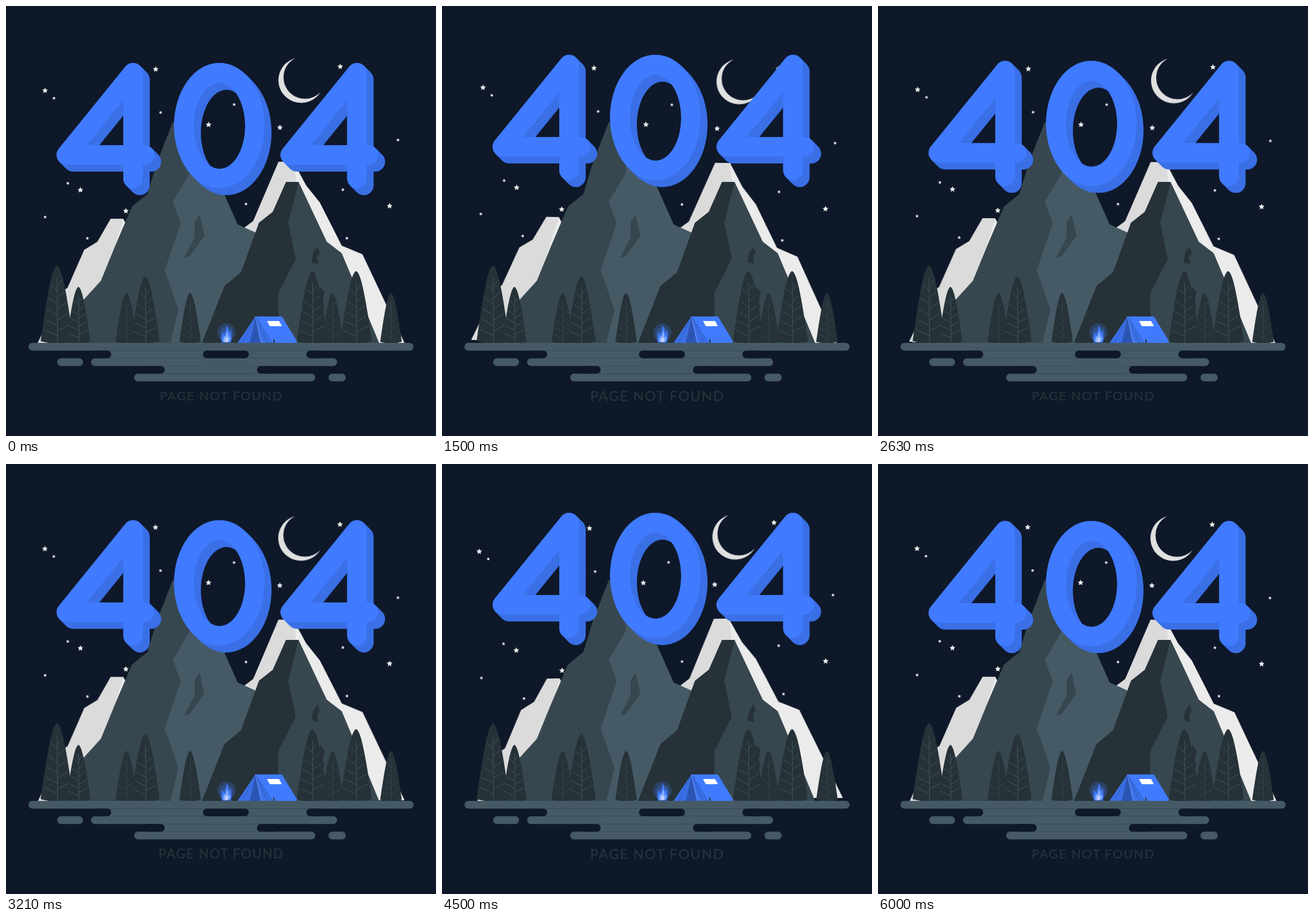
Animation, 748 px wide and 748 px high, one loop 6040 ms. Source, as an HTML page:

```html
<!DOCTYPE html>
<html lang="en">
<head>
<meta charset="utf-8">
<title>Page not found</title>
<style>
  html, body { margin: 0; width: 100%; height: 100%; overflow: hidden; background: #0e1829; }
  svg { display: block; width: 100%; height: 100%; }
  .sky, .digits, .caption { animation: 6040ms linear infinite; transform-box: view-box; }
  .sky { animation-name: sway; transform-origin: 373.6px 338.5px; }
  .digits { animation-name: float; }
  .caption { animation-name: beat; animation-timing-function: ease-in-out; transform-origin: 373.7px 678px; }

  @keyframes sway {
    0% { transform: rotate(-.027deg); }
    25.5% { transform: rotate(1deg); }
    75.17% { transform: rotate(-1deg); }
    100% { transform: rotate(0deg); }
  }
  @keyframes float {
    0% { transform: translateY(0); }
    .66%, 50.33%, 100% { transform: translateY(.4px); }
    25.5%, 75.17% { transform: translateY(-14.56px); }
  }
  @keyframes beat {
    0%, 1.57%, 15.48%, 33.1%, 51.24%, 65.15%, 82.8%, 100% { transform: scale(1); }
    8.53%, 22.43%, 58.2%, 72.1% { transform: scale(1.1); }
  }

  .snow { fill: #ebebeb; }
  .frost { fill: #dbdbdb; }
  .light { fill: #455a64; }
  .mid { fill: #37474f; }
  .dark { fill: #263238; }
  .gap { fill: #0e1829; }
  .blue { fill: #407bff; }
  .front { --ink: #407bff; }
  .side { --ink: #3a6fe6; }
  .four { fill: none; stroke: var(--ink); stroke-width: 34; stroke-linecap: round; stroke-linejoin: round; }
  .zero { fill: var(--ink); fill-rule: evenodd; }
  text { font: 400 22px Lato, "Open Sans", sans-serif; letter-spacing: 1.6px; fill: #263238; stroke: #263238; stroke-width: .4; }
</style>
</head>
<body>
<svg viewBox="0 0 748 748">
  <defs>
    <path id="four" class="four" d="M221 116V300M221 116L105 259H241"/>
    <path id="zero" class="zero" d="M292.3 208a78.8 109 0 1 1 157.6 0a78.8 109 0 1 1-157.6 0ZM327 208.5a44.5 74.7 0 1 1 89 0a44.5 74.7 0 1 1-89 0Z"/>
    <g id="number">
      <use href="#four"/>
      <use href="#zero"/>
      <use href="#four" x="389.5"/>
    </g>
  </defs>

  <g class="sky">
    <g id="stars" class="snow"></g>
    <path fill="#e0e0e0" d="M503 91A39.5 39.5 0 1 0 547 150A37.3 37.3 0 1 1 503 91Z"/>
    <path class="snow" d="M204 370L232 424V586H120Z"/>
    <path class="frost" d="M55 586L97 497L107 490L136 424L159 410L182 370H204L185 432L150 586Z"/>
    <path class="snow" d="M500 271L522 312L546 342L584 417L620 432L662 521L693 586H480Z"/>
    <path class="frost" d="M474 271H501L504 300L500 586L414 386L430 374Z"/>
  </g>

  <path class="mid" d="M290 202L262 274L246 327L219 349L190 417L165 478L135 511L113 540L95 586H300L330 290L297 202Z"/>
  <path class="light" d="M297 202L375 317L403 380L434 394L480 420V586H286L300 528L276 460L304 378L290 341L319.500 291V270Z"/>
  <path class="mid" d="M337 363L345 400L319 436L310 437L328 403V376Z"/>
  <path class="mid" d="M509 306L558 410L584 430L608 487L649 586H470V400Z"/>
  <path class="dark" d="M487 306H509L491 377L504 440L474 499V586H341L380 487L409 463L440 377L464 358Z"/>
  <path class="dark" d="M542 418L546 430L541 435L543 449L531 446L535 428ZM547 489L554 497L551 515L554 525L546 533L543 500Z"/>

  <g class="digits">
    <g id="depth" class="side"></g>
    <use class="front" href="#number"/>
  </g>

  <g id="trees"></g>

  <g id="fire" class="blue">
    <circle cx="383.500" cy="568" r="16" opacity=".22"/>
    <circle cx="383.500" cy="570" r="11.500" opacity=".25"/>
    <path d="M376 585C372 577 377 574 376 567C379 569 379 572 380 574C380 566 385 563 383 555C388 560 387 565 388 570C389 568 390 566 390 563C393 571 391 573 392 576C394 580 391 584 390 585Z"/>
    <path fill="#8cb0ff" d="M379 585C376 580 380 577 380 573C382 575 382 577 382 578C382 573 385 570 384 565C388 571 386 574 387 578L389 574C391 580 389 583 387 585Z"/>
    <path fill="#c5d7ff" d="M382 585C380 581 383 579 384 575C387 580 386 583 385 585Z"/>
    <path stroke="#2d56b3" stroke-width="1.500" d="M375 585.500H393"/>
  </g>

  <g id="tent">
    <path class="blue" d="M434 540H480L506 583V586H403Z"/>
    <path fill="#3a6fe6" d="M434 540L403 586H426Z"/>
    <path fill="#2d56b3" d="M434 540L424 586H443Z"/>
    <path fill="#3a6fe6" d="M434 540L443 586H463Z"/>
    <path fill="none" stroke="#2d56b3" stroke-width=".8" d="M434 540L412 586M434 540L455 586M434 540L463 586"/>
    <path fill="none" stroke="#8cb0ff" stroke-width=".7" d="M434 540L442 575L446 586"/>
    <path fill="#fff" d="M454 548H475L480 557H459Z"/>
    <path stroke="#263238" stroke-width="2" d="M466 580V586"/>
  </g>

  <g id="ground" class="light">
    <rect x="39" y="586" width="670" height="13.400" rx="6.700"/>
    <rect x="170" y="599.400" width="366" height="13.400"/>
    <rect x="89" y="612.800" width="45" height="13.400" rx="6.700"/>
    <rect x="148" y="612.800" width="428" height="13.400" rx="6.700"/>
    <rect x="262" y="626.200" width="188" height="13.400"/>
    <rect x="223" y="639.600" width="315" height="13.400" rx="6.700"/>
    <rect x="561" y="639.600" width="30" height="13.400" rx="6.700"/>
    <g class="gap">
      <rect x="150" y="599.400" width="33" height="13.400" rx="6.700"/>
      <rect x="342.500" y="599.400" width="80" height="13.400" rx="6.700"/>
      <rect x="522.500" y="599.400" width="33" height="13.400" rx="6.700"/>
      <rect x="240" y="626.200" width="36" height="13.400" rx="6.700"/>
      <rect x="436.500" y="626.200" width="36" height="13.400" rx="6.700"/>
    </g>
  </g>

  <g class="caption"><text x="374.500" y="686" text-anchor="middle">PAGE NOT FOUND</text></g>
</svg>
<script>
  const fill = (id, parts) => { document.getElementById(id).innerHTML = parts.join(''); };

  // Stars: centre and outer radius
  const star = (x, y, r) => {
    const points = Array.from({ length: 10 }, (_, i) => {
      const a = i * Math.PI / 5, d = i % 2 ? r * .5 : r;
      return `${(x + d * Math.sin(a)).toFixed(2)},${(y - d * Math.cos(a)).toFixed(2)}`;
    });
    return `<polygon points="${points.join(' ')}"/>`;
  };
  const big = [[68, 147], [260.5, 110], [352.5, 206.5], [476.5, 211.5], [581.5, 105.5],
    [129.5, 320], [208.5, 356.5], [667.3, 348]];
  const small = [[83.5, 160.3], [269, 185.3], [397, 171.5], [682, 233.2], [107.5, 308.2],
    [68, 367], [141.5, 404], [417.5, 344.5], [586, 319.7], [593, 404]];
  fill('stars', [...big.map(p => star(...p, 5.2)), ...small.map(p => star(...p, 3.1))]);

  // The side of the digits is their face swept down to the right
  fill('depth', Array.from({ length: 25 }, (_, i) => `<use href="#number" x="${i / 2}" y="${i / 2}"/>`));

  // Trees: centre, half width, top, line colour
  const tree = ([x, w, top, line]) => {
    const h = 587 - top;
    const side = s => `${s * w * .3} ${h * .03}`;
    const hip = s => `${s * w * .55} ${h * .3}`;
    const branch = (y, s) =>
      `M.8 ${h * y}L${s * w * (.12 + .78 * y)} ${h * (y - .08)}`;
    const twigs = [.33, .5, .64, .77, .9].map(y => branch(y, -1))
      .concat([.27, .42, .56, .7, .84].map(y => branch(y, 1)));
    return `<g transform="translate(${x} ${top})">
      <path class="dark" d="M0 0C${side(1)} ${hip(1)} ${w} ${h * .97}Q0 ${h * 1.03} ${-w} ${h * .97}C${hip(-1)} ${side(-1)} 0 0Z"/>
      <path fill="none" stroke="${line}" stroke-width=".9" d="M.3 ${h * .16}L1 ${h}${twigs.join('')}"/></g>`;
  };
  const pale = '#455a64', dim = '#37474f';
  fill('trees', [
    [88.7, 28.5, 451, pale], [126, 21, 488.5, pale], [209.7, 19.3, 499, dim],
    [242.3, 25, 470, pale], [320.3, 18.7, 499, dim], [568, 19, 499.5, dim],
    [533, 27, 461, pale], [609, 27.5, 461, pale], [669.7, 18.8, 499, dim]
  ].map(tree));
</script>
</body>
</html>
```
